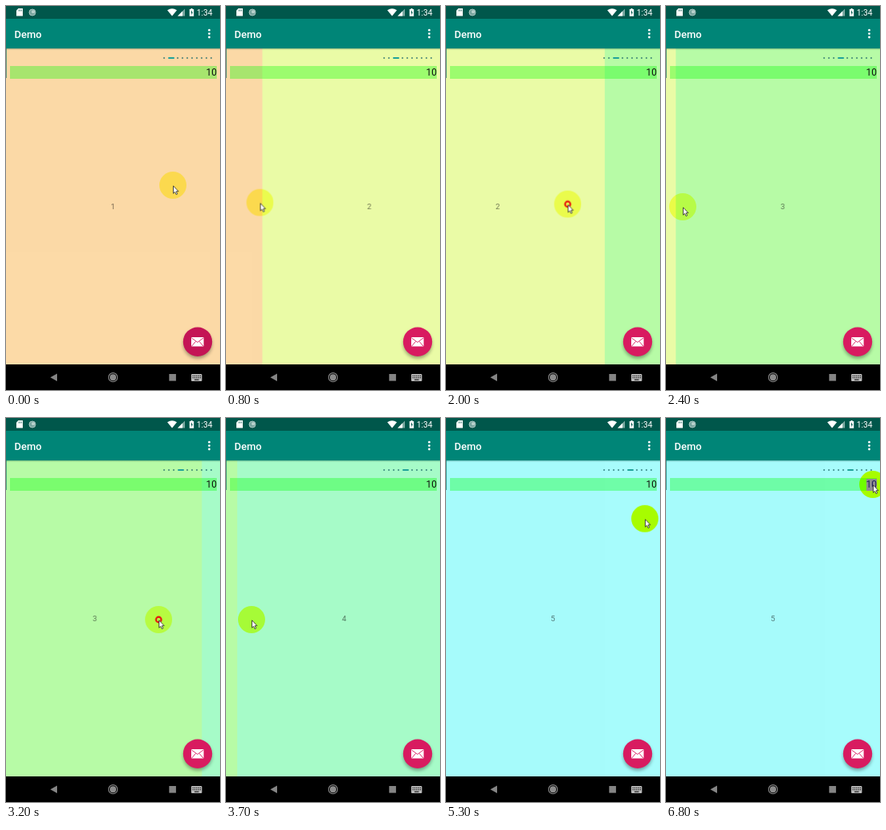
Recreate the animation shown at these times as an HTML page. Size 268 by 480 pixels, loop 8000 ms.

```html
<!DOCTYPE html>
<html lang="en">
<head>
<meta charset="utf-8">
<title>Demo</title>
<style>
html, body { margin: 0; width: 100%; height: 100%; overflow: hidden; background: #000; }
#stage {
  position: relative; width: 268px; height: 480px; overflow: hidden; isolation: isolate;
  background: #000; font-family: Roboto, "Open Sans", sans-serif;
}
#stage > * { position: absolute; }
.track, .left, .disc, .pointer, .ring, .picked, .fab { animation: 8s linear infinite; }

/* pager */
.pager { left: 0; top: 53px; width: 268px; height: 395px; overflow: hidden; background: #fafafa; }
.track { display: flex; width: 1340px; height: 100%; animation-name: swipe; }
.page {
  width: 268px; height: 395px; line-height: 396px; text-align: center;
  font-size: 9.5px; color: rgba(0, 0, 0, .54);
  background: hsl(calc(var(--n) * 36) 100% 50% / .333);
}
@keyframes swipe {
  0%, 4.375% { transform: translateX(0); }
  8.75% { transform: translateX(-150px); animation-timing-function: cubic-bezier(.33, 1, .68, 1); }
  13.375%, 23.125% { transform: translateX(-268px); }
  27.625% { transform: translateX(-433px); animation-timing-function: cubic-bezier(.33, 1, .68, 1); }
  32.29%, 39.375% { transform: translateX(-536px); }
  44% { transform: translateX(-701px); animation-timing-function: cubic-bezier(.33, 1, .68, 1); }
  48.625%, 54.375% { transform: translateX(-804px); }
  57.5% { transform: translateX(-930px); }
  58.5% { transform: translateX(-960px); animation-timing-function: cubic-bezier(.33, 1, .68, 1); }
  63.125%, 100% { transform: translateX(-1072px); }
}

/* page indicator */
.dots { left: 195px; top: 62px; width: 65px; height: 6px; display: flex; }
.left, .right { background: radial-gradient(circle at 3px 3px, rgba(30, 105, 105, .6) 1px, transparent 1.6px) 0 0 / 6px 6px; }
.left { flex: none; width: 6px; animation-name: select; animation-timing-function: step-end; }
.right { flex: 1; }
.dash { flex: none; width: 8px; height: 2.4px; margin: 1.8px 1.5px; border-radius: 1.2px; background: #1fa39a; }
@keyframes select {
  0% { width: 6px; }
  8.75% { width: 12px; }
  27.625% { width: 18px; }
  44% { width: 24px; }
  58.5%, 100% { width: 30px; }
}

/* number field */
.field {
  left: 5px; top: 75px; width: 259px; height: 16px; line-height: 17px;
  text-align: right; font-size: 12px; color: #111; background: rgba(0, 255, 0, .333);
}
.picked {
  left: 250.5px; top: 76px; width: 13.5px; height: 14.5px; line-height: 15px;
  text-align: right; font-size: 12px; color: #20205c; background: #8f8c92;
  animation-name: pick; animation-timing-function: step-end;
}
@keyframes pick { 0% { opacity: 0; } 80%, 100% { opacity: 1; } }

.edge { left: 0; top: 53px; width: 1px; height: 37px; background: rgba(0, 110, 98, .6); }
.shade { left: 0; top: 53px; width: 268px; height: 2px; background: linear-gradient(rgba(0, 60, 50, .35), transparent); }
.fab { animation-name: glow; }
@keyframes glow { 0% { fill: #c41455; } 10%, 100% { fill: #d81b60; } }

/* pointer */
.disc {
  left: -17px; top: -17px; width: 34px; height: 34px; border-radius: 50%;
  mix-blend-mode: multiply; animation-name: move, tint;
}
.pointer { left: 0; top: 0; overflow: visible; animation-name: move; }
.ring { animation-name: press; animation-timing-function: step-end; }
@keyframes move {
  0% { transform: translate(209px, 224px); }
  4.375% { transform: translate(215px, 238px); }
  8.75% { transform: translate(57px, 244px); animation-timing-function: ease-out; }
  10.625% { transform: translate(40px, 246px); animation-timing-function: ease-in-out; }
  18.75% { transform: translate(225px, 240px); }
  23.125% { transform: translate(225px, 246px); }
  27.625% { transform: translate(52px, 250px); animation-timing-function: ease-out; }
  30% { transform: translate(21px, 251px); animation-timing-function: ease-in-out; }
  38.5%, 39.375% { transform: translate(215px, 252px); }
  44% { transform: translate(42px, 252px); animation-timing-function: ease-out; }
  46.25% { transform: translate(32px, 252px); animation-timing-function: ease-in-out; }
  53.125%, 54.375% { transform: translate(203px, 246px); }
  57.5% { transform: translate(69px, 248px); }
  58.5% { transform: translate(39px, 249px); }
  60% { transform: translate(34px, 248px); animation-timing-function: ease-in-out; }
  66.25% { transform: translate(249px, 126px); animation-timing-function: ease-out; }
  72.5%, 100% { transform: translate(259px, 83px); }
}
@keyframes tint {
  0%, 23% { background: #ffff78; }
  32%, 39% { background: #ffff68; }
  46%, 58.5% { background: #ffff46; }
  63%, 100% { background: #ff0; }
}
@keyframes press {
  0% { opacity: 0; }
  4.375% { opacity: 1; }
  8.75% { opacity: 0; }
  23.125% { opacity: 1; }
  27.625% { opacity: 0; }
  39.375% { opacity: 1; }
  44% { opacity: 0; }
  54.375% { opacity: 1; }
  58.5% { opacity: 0; }
  78% { opacity: 1; }
  80%, 100% { opacity: 0; }
}
</style>
</head>
<body>
<div id="stage">
  <div class="pager">
    <div class="track">
      <div class="page" style="--n:1">1</div>
      <div class="page" style="--n:2">2</div>
      <div class="page" style="--n:3">3</div>
      <div class="page" style="--n:4">4</div>
      <div class="page" style="--n:5">5</div>
    </div>
  </div>
  <div class="shade"></div>
  <div class="edge"></div>
  <div class="dots"><i class="left"></i><i class="dash"></i><i class="right"></i></div>
  <div class="field">10</div>

  <svg width="268" height="480" style="left:0;top:0">
    <defs>
      <filter id="blur" x="-40%" y="-40%" width="180%" height="180%"><feGaussianBlur stdDeviation="2"/></filter>
    </defs>
    <!-- status bar -->
    <rect width="268" height="16" fill="#00574b"/>
    <path d="M15.5 3H21V12.5H13V5.5Z" fill="#fff"/>
    <path d="M16 4.5v2M17.7 4.5v2M19.4 4.5v2" stroke="#00574b" stroke-width=".7"/>
    <circle cx="33" cy="8" r="4" fill="#78a59e" stroke="#a9c6c1"/>
    <circle cx="34" cy="7.3" r="2" fill="#bcd3cf"/>
    <path d="M202 5.2Q208 1.2 214 5.2L208 12.5Z" fill="#fff"/>
    <path d="M224 3.5V12.5H215Z" fill="#7da9a2"/>
    <path d="M221 6.5V12.5H215Z" fill="#fff"/>
    <path d="M231.5 3h2v1h1.7v8.7h-5.4V4h1.7Z" fill="#fff"/>
    <path d="M233 5.2l-1.6 3.4h1v2.6l1.6-3.5h-1Z" fill="#00574b"/>
    <text x="258.5" y="12" font-size="10.3" text-anchor="end" fill="#fff">1:34</text>

    <!-- toolbar -->
    <rect y="16" width="268" height="37" fill="#008577"/>
    <text x="10.5" y="39.5" font-size="13" font-weight="500" fill="#fff">Demo</text>
    <g fill="#fff">
      <circle cx="254.5" cy="30.2" r="1.4"/><circle cx="254.5" cy="34.6" r="1.4"/><circle cx="254.5" cy="39" r="1.4"/>
    </g>

    <!-- action button -->
    <circle cx="240" cy="422.5" r="18" fill="#000" opacity=".35" filter="url(#blur)"/>
    <circle class="fab" cx="240" cy="419.7" r="18.2"/>
    <rect x="232" y="414" width="15.6" height="11.6" rx="1" fill="#fff"/>
    <path d="M232.5 415l7.3 5.4 7.3-5.4M232.7 425l4.8-5.6M246.9 425l-4.8-5.6" fill="none" stroke="#d81b60" stroke-width=".9"/>

    <!-- navigation bar -->
    <rect y="448" width="268" height="32"/>
    <path d="M64 459.5v9.5l-8.5-4.75Z" fill="#858585"/>
    <circle cx="134" cy="464.2" r="5.6" fill="none" stroke="#858585" stroke-width="1.1"/>
    <circle cx="134" cy="464.2" r="4" fill="#8c8c8c"/>
    <rect x="204.3" y="460" width="8.6" height="8.6" fill="#858585"/>
    <rect x="232" y="460" width="13.4" height="9" rx="1" fill="#bbb"/>
    <path d="M233.6 462.4h10.4M233.6 464.6h10.4" stroke="#111" stroke-width="1.2" stroke-dasharray="1.2 1.1"/>
    <path d="M236 467.2h5.5" stroke="#111" stroke-width="1.1"/>
  </svg>

  <div class="disc"></div>
  <div class="picked">10</div>
  <svg class="pointer" width="1" height="1">
    <circle class="ring" r="3.3" fill="none" stroke="#e8140c" stroke-width="2.2"/>
    <path d="M.5 .8V10.2L2.6 8.3 4.1 11.6 5.6 10.9 4.2 7.7H7Z" fill="#fff" stroke="#222" stroke-width=".8" stroke-linejoin="round"/>
  </svg>
</div>
</body>
</html>
```
